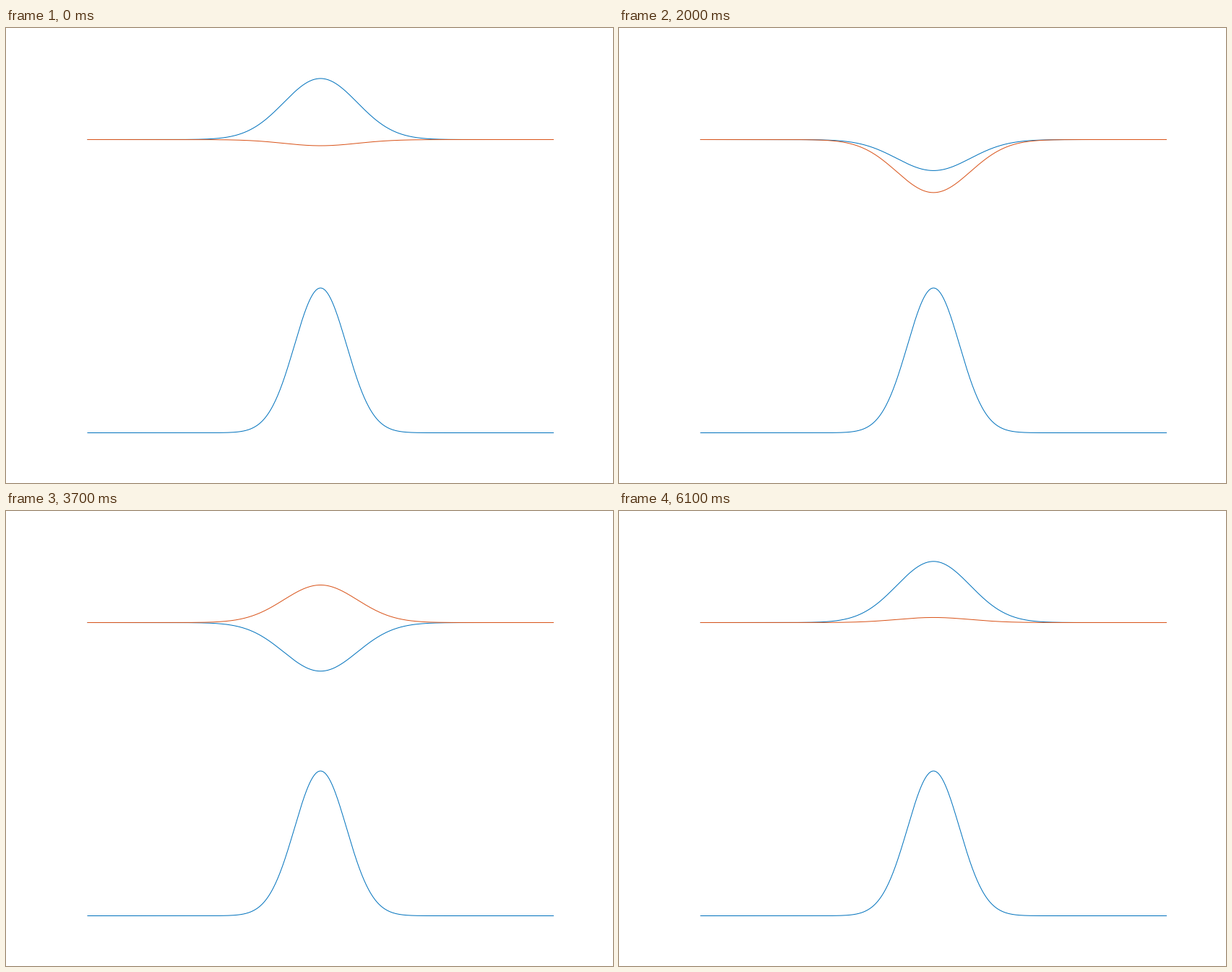
Animation, 840 px wide and 630 px high, one loop 6.2 s. Source, as a matplotlib script:

```python
import numpy as np
import matplotlib.pyplot as plt
from matplotlib.animation import FuncAnimation

W, H, DPI = 840, 630, 100
FRAMES, INTERVAL = 62, 100
STEP = 0.1  # phase advance per frame
BLUE, RED = "#0072BD", "#D95319"

CENTER = 435.25
HALF_WIDTH = 322.75
SIGMA = 50.9  # width of the wave packet in pixels
WAVE_Y, WAVE_AMP = 154.5, 85
DENSITY_Y, DENSITY_AMP = 560.5, 200.5

fig = plt.figure(figsize=(W / DPI, H / DPI), dpi=DPI, facecolor="white")
ax = fig.add_axes([0, 0, 1, 1])
ax.set_xlim(0, W)
ax.set_ylim(H, 0)
ax.axis("off")

x = np.linspace(CENTER - HALF_WIDTH, CENTER + HALF_WIDTH, 601)
packet = np.exp(-((x - CENTER) / SIGMA) ** 2 / 2)


def curve(y, color):
    line, = ax.plot(x, y, color=color, lw=72 / DPI, snap=False,
                    solid_capstyle="butt")
    return line


real = curve(WAVE_Y - WAVE_AMP * packet, BLUE)
imag = curve(np.full_like(x, WAVE_Y), RED)
curve(DENSITY_Y - DENSITY_AMP * packet ** 2, BLUE)


def update(i):
    # real and imaginary part of packet * exp(-i t)
    t = STEP * (i + 1)
    real.set_ydata(WAVE_Y - WAVE_AMP * packet * np.cos(t))
    imag.set_ydata(WAVE_Y + WAVE_AMP * packet * np.sin(t))
    return real, imag


anim = FuncAnimation(fig, update, frames=FRAMES, interval=INTERVAL,
                     repeat=True, repeat_delay=0)
plt.show()
```
